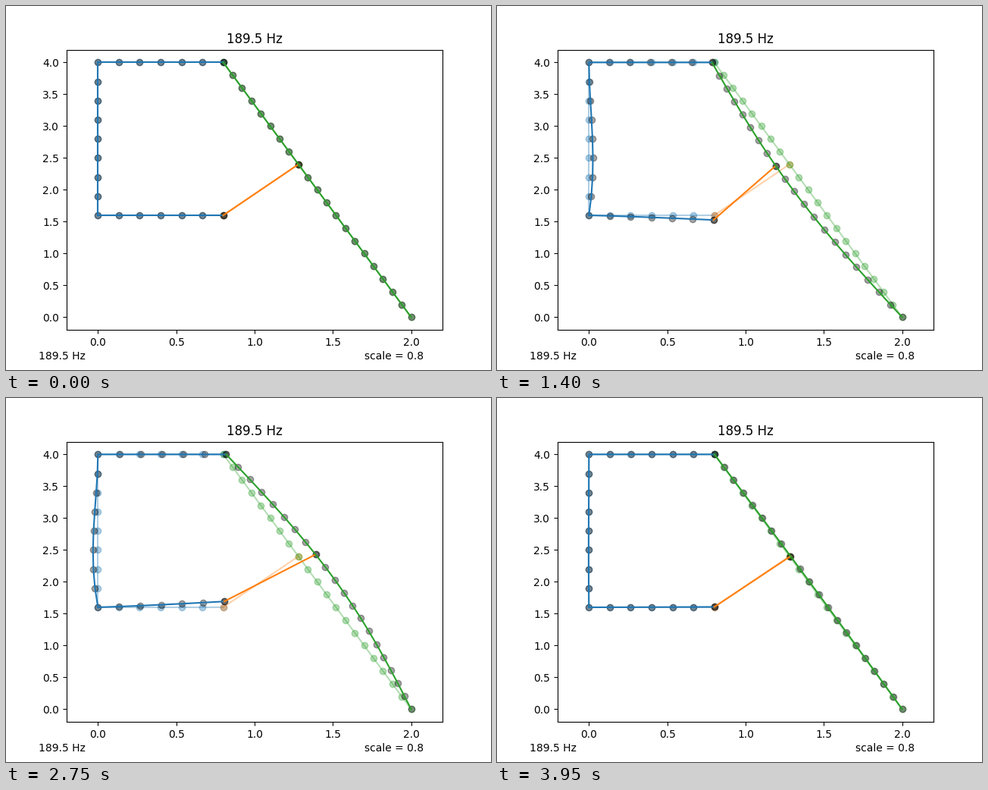
Recreate the animation shown at these times as a matplotlib script. Size 640 by 480 pixels, loop 4 s.

```python
import numpy as np
import matplotlib.pyplot as plt
from matplotlib.animation import FuncAnimation

FRAMES = 80
FREQ = "189.5 Hz"
SCALE = 0.8


def segment(start, end, parts):
    return np.linspace(start, end, parts + 1)


# Frame geometry: top, wall and bottom beams, then strut and brace
top = segment((0.8, 4), (0, 4), 6)
wall = segment((0, 4), (0, 1.6), 8)
bottom = segment((0, 1.6), (0.8, 1.6), 6)
brace = segment((0.8, 4), (2, 0), 20)
strut = brace[8]


def top_mode(p):
    return np.column_stack([0.0247 * p[:, 0] / 0.8, 0 * p[:, 0]])


def wall_mode(p):
    s = (p[:, 1] - 1.6) / 2.4
    return np.column_stack([-0.25 * s * (1 - s) ** 2 * (1 + 0.4 * s), 0 * s])


def bottom_mode(p):
    s = p[:, 0] / 0.8
    return np.column_stack([0.008 * s, 0.083 * s + 0.0195 * (3 * s**2 - s**3)])


def brace_mode(p):
    s = (4 - p[:, 1]) / 4
    bow = np.sin(np.pi * s)
    return np.column_stack([0.138 * bow + 0.0247 * (1 - s), 0.0414 * bow])


frame = np.vstack([top, wall[1:], bottom[1:]])
frame_mode = np.vstack([top_mode(top), wall_mode(wall)[1:], bottom_mode(bottom)[1:]])
diagonal_mode = brace_mode(brace)
members = [
    (frame, frame_mode),
    (np.array([bottom[-1], strut]), np.array([frame_mode[-1], diagonal_mode[8]])),
    (brace, diagonal_mode),
]

fig, ax = plt.subplots(figsize=(6.4, 4.8), dpi=100)
ax.set(xlim=(-0.2, 2.2), ylim=(-0.2, 4.2), title=FREQ)
for x, label in ((0.05, FREQ), (0.95, f"scale = {SCALE}")):
    ax.text(x, -0.105, label, ha="right", transform=ax.transAxes)

moving = []
for i, (rest, mode) in enumerate(members):
    color = f"C{i}"
    ax.plot(*rest.T, "o-", color=color, alpha=0.35, zorder=2)
    dots, = ax.plot(*rest.T, "o", color="black", alpha=0.35, zorder=2.5)
    line, = ax.plot(*rest.T, color=color, zorder=3)
    moving.append((rest, mode, dots, line))


def amplitude(k):
    """Triangle wave: 0, -1, 0, 1, 0 over one loop."""
    u = 4 * k / FRAMES
    return abs(u - 1) - 1 if u < 2 else 1 - abs(u - 3)


def update(k):
    a = amplitude(k)
    for rest, mode, dots, line in moving:
        pos = (rest + a * mode).T
        dots.set_data(*pos)
        line.set_data(*pos)
    return [artist for m in moving for artist in m[2:]]


anim = FuncAnimation(fig, update, frames=FRAMES, interval=50, repeat=True, repeat_delay=0)
plt.show()
```
